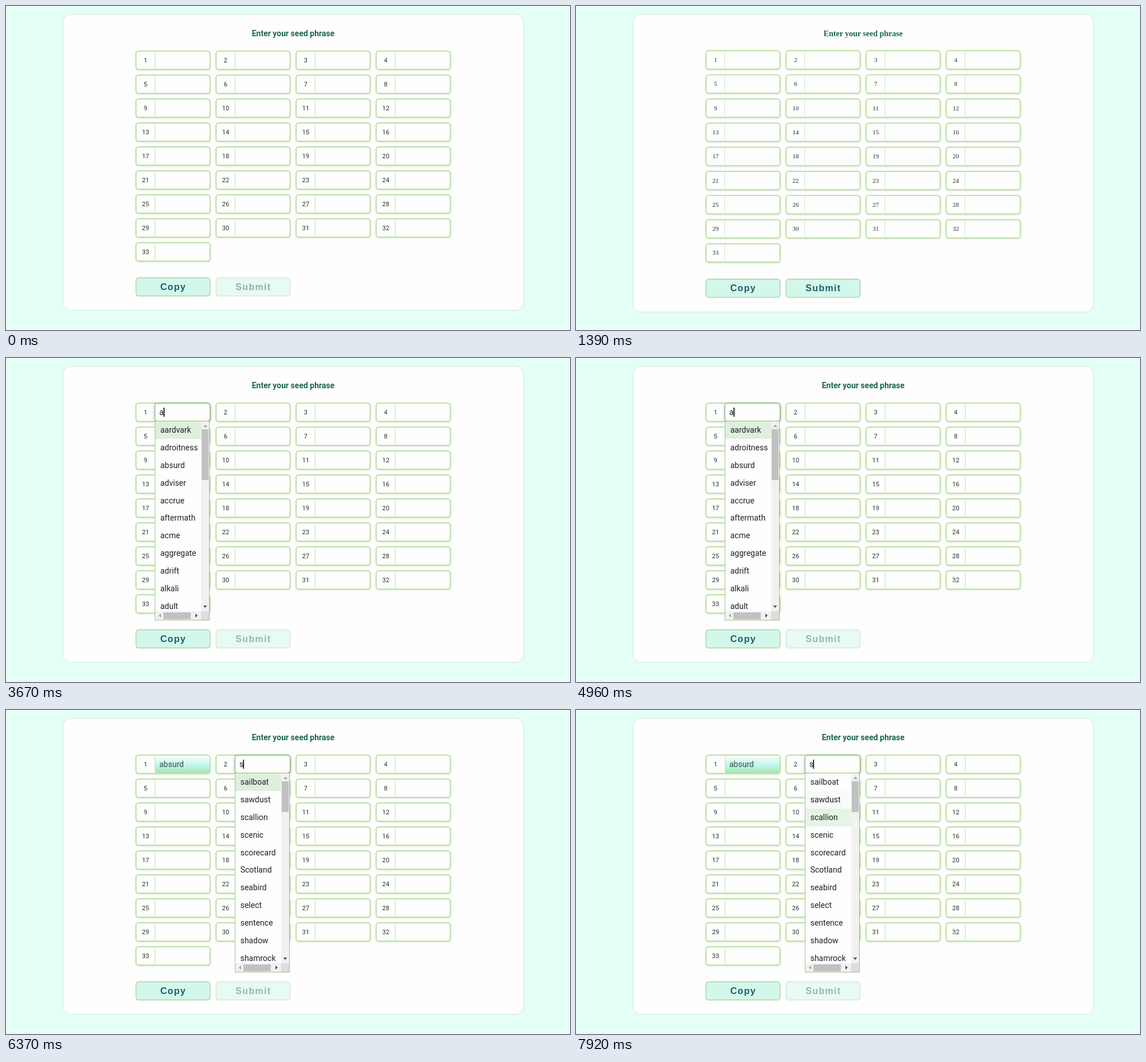
These frames come from a looping animation (986x568 px, 7990 ms). An HTML page:

```html
<!DOCTYPE html>
<html lang="en">
<head>
<meta charset="utf-8">
<title>Seed phrase form</title>
<style>
html, body { margin: 0; width: 100%; height: 100%; overflow: hidden; background: #e3fff6; }
#stage { position: relative; width: 986px; height: 568px; overflow: hidden; font-family: Roboto, sans-serif; color: #222; }
#stage > *, .menu * { position: absolute; box-sizing: border-box; white-space: nowrap; }
.form { left: 0; top: 0; text-anchor: middle; }
.bare { font-family: "Liberation Serif", serif; }
.card { fill: #fefefe; stroke: #d4e7df; }
.title { font-size: 14px; font-weight: 700; fill: #1a6456; }
.boxes { fill: #fefefe; stroke: #b1e18f; stroke-width: 1.7; filter: drop-shadow(0 1px 1.8px rgba(40, 90, 60, .2)); }
.lines { fill: none; stroke: #bde5a0; }
.bare .lines { stroke: #cfe3c0; }
.nums { font-size: 11px; fill: #2c2c2c; }
.btn rect { fill: #d4f7ec; stroke: #b1dba6; stroke-width: 1.7; }
.btn text { font: 700 16px "Liberation Sans", Arial, sans-serif; letter-spacing: 1.35px; fill: #1a6064; }
.focus { top: 79px; width: 97px; height: 32px; background: #fefefe; border: 1px solid #8cc068; border-radius: 5px; box-shadow: 0 1px 4px rgba(45, 85, 30, .55); }
#done { left: 261px; top: 80px; width: 95px; height: 31px; border-radius: 4px; background: linear-gradient(#fbfffd, #b6f3e4 65%, #a9e3a0); }
.typed { top: 78px; font-size: 14px; line-height: 34px; }
.menu { top: 111px; width: 96px; height: 349px; background: #fefefe; border: 1px solid #9fc488; border-top: 0; overflow: hidden; }
.item { left: 0; width: 80px; height: 31px; padding-left: 8.7px; font-size: 14px; line-height: 31px; }
.vbar { left: 80px; top: 0; width: 14px; height: 333px; background: #f1f1f1; }
.hbar { left: 0; top: 333px; width: 80px; height: 15px; background: #f1f1f1; }
.corner { left: 80px; top: 333px; width: 14px; height: 15px; background: #dcdcdc; }
.thumb { background: #c1c1c1; }
.menu svg, #caret { left: 0; top: 0; }
</style>
</head>
<body>
<div id="stage"></div>
<script>
const LOOP = 7990;
const stage = document.getElementById('stage');

function add(parent, cls, css = '', text = '') {
  const el = document.createElement('div');
  el.className = cls;
  el.style.cssText = css;
  el.textContent = text;
  return parent.appendChild(el);
}

function addSvg(attrs, body) {
  stage.insertAdjacentHTML('beforeend', `<svg width="986" height="568" ${attrs}>${body}</svg>`);
  return stage.lastElementChild;
}

const frame = (x, y, h) =>
  `<rect x="${x + .85}" y="${y + .85}" width="129.3" height="${h - 1.7}" rx="4.5"/>`;

function makeForm({ cls, top, pitch, line, base, btn, card }) {
  let boxes = '', lines = '', nums = '';
  for (let n = 0; n < 33; n++) {
    const x = 226.5 + n % 4 * 140;
    const dy = Math.floor(n / 4) * pitch;
    boxes += frame(x, top + dy, 33.8);
    lines += `<path d="M${x + line + 2} ${top + dy + 2.2}q-2 1.2 -2 4v21.5q0 2.8 2 4"/>`;
    nums += `<text x="${x + 17.4}" y="${base + dy}">${n + 1}</text>`;
  }
  const button = (x, label) => `<g class="btn">${frame(x, btn, 33.6)}
    <text x="${x + 65.9}" y="${btn + 22.2}">${label}</text></g>`;
  return addSvg(`class="form ${cls}"`, `
    <rect class="card" x="99.5" y="14.5" width="805" height="${card}" rx="14"/>
    <text class="title" x="502" y="53">Enter your seed phrase</text>
    <g class="boxes">${boxes}</g><g class="lines">${lines}</g><g class="nums">${nums}</g>
    ${button(226.5, 'Copy')}${button(366.5, 'Submit')}`);
}

const form = makeForm({ cls: '', top: 78.2, pitch: 42, line: 34, base: 99, btn: 475.6, card: 519 });
const bare = makeForm({ cls: 'bare', top: 77.6, pitch: 42.3, line: 33.3, base: 98, btn: 478, card: 522 });
const submit = form.lastElementChild;
const submitText = submit.querySelector('text');

const done = add(stage, '');
done.id = 'done';
const focus = [260, 400].map(x => add(stage, 'focus', `left:${x}px`));
const typed = [268, 408].map(x => add(stage, 'typed', `left:${x}px`));
const caret = addSvg('id="caret"', '<rect y="87" width="1.6" height="16"/>');

function makeMenu(x, words, thumb) {
  const el = add(stage, 'menu', `left:${x}px`);
  const items = words.split(' ').map((word, i) =>
    add(el, 'item', `top:${.2 + i * 30.85}px`, word));
  add(el, 'vbar');
  add(el, 'hbar');
  add(el, 'corner');
  add(el, 'thumb', `left:81px;top:14px;width:12px;height:${thumb}px`);
  add(el, 'thumb', 'left:14px;top:335px;width:48px;height:12px');
  el.insertAdjacentHTML('beforeend', `<svg width="94" height="348">
    <path fill="#a3a3a3" d="M84 10h7l-3.5-4zM10 337v7l-4-3.5z"/>
    <path fill="#505050" d="M83.5 323h7l-3.5 4zM70 337v7l4-3.5z"/></svg>`);
  return { el, items };
}

const menus = [
  makeMenu(260, 'aardvark adroitness absurd adviser accrue aftermath acme aggregate adrift alkali adult', 89),
  makeMenu(400, 'sailboat sawdust scallion scenic scorecard Scotland seabird select sentence shadow shamrock', 54)
];

// Visible caret spans: from, to, x
const carets = [
  [1460, 1930, 267.8], [2460, 2600, 267.8],
  [2600, 3140, 275.5], [3670, 4200, 275.5], [4680, 5230, 275.5],
  [5290, 5840, 407.8], [6370, 6920, 414.5], [7450, LOOP, 414.5]
];

// Highlight strength of the first items: from, then one value per item
const hovers = [[0, 1, 0, 0], [7720, 0, 1, 0], [7920, 0, .25, .75]];

const within = (t, a, b) => t >= a && t < b;
const ramp = (t, a, b) => Math.min(1, Math.max(0, (t - a) / (b - a)));
const show = (el, on) => { el.style.visibility = on ? 'visible' : 'hidden'; };

function render(t) {
  const reloading = within(t, 1260, 1460);
  show(bare, reloading);
  show(form, !reloading);

  submit.style.opacity = t < 1260 ? .5 : 1 - .5 * ramp(t, 1440, 1590);
  submitText.style.fill = t < 450 ? '#1a6064' : '#257568';

  focus[0].style.opacity = ramp(t, 1440, 1590) * (1 - ramp(t, 5200, 5290));
  focus[1].style.opacity = ramp(t, 5290, 5640);
  show(done, t >= 5230);

  typed[0].textContent = t < 2600 ? '' : t < 5230 ? 'a' : 'absurd';
  typed[0].style.color = t < 5230 ? '#222' : '#34504a';
  typed[1].textContent = t < 6370 ? '' : 's';

  const span = carets.find(([a, b]) => within(t, a, b));
  show(caret, span);
  if (span) caret.firstElementChild.setAttribute('x', span[2]);

  show(menus[0].el, within(t, 2600, 5230));
  show(menus[1].el, t >= 6370);
  const hover = hovers.filter(h => t >= h[0]).pop();
  for (const { items } of menus) {
    for (let i = 0; i < 3; i++) {
      items[i].style.background = `rgba(222,240,221,${hover[i + 1]})`;
    }
  }
}

const start = performance.now();
function tick() {
  render((performance.now() - start) % LOOP);
  requestAnimationFrame(tick);
}
render(0);
requestAnimationFrame(tick);
</script>
</body>
</html>
```
